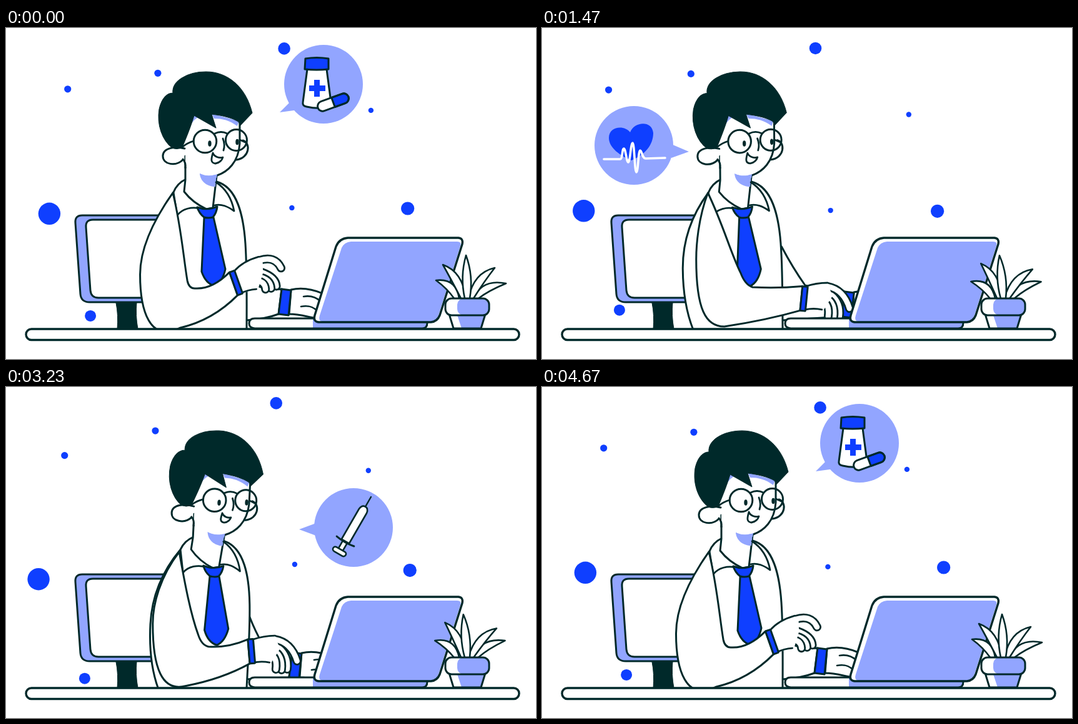
Recreate the animation shown at these times as an HTML page with a canvas. Size 848 px wide and 530 px high, loop 4710 ms.

```html
<!DOCTYPE html>
<html lang="en">
<head>
<meta charset="utf-8">
<title>At the desk</title>
<style>
html, body { margin: 0; width: 100%; height: 100%; overflow: hidden; background: #fff; }
canvas { display: block; width: 848px; height: 530px; }
</style>
</head>
<body>
<canvas id="stage" width="848" height="530"></canvas>
<script>
const ctx = document.getElementById('stage').getContext('2d');
const INK = '#00292a', BLUE = '#0f3fff', PALE = '#92a5ff', WHITE = '#fff';
const LOOP = 4710, CYCLE = 4670, TYPING = CYCLE / 4, TURN = 2 * Math.PI;

// Smooth periodic curve through values at uneven times
function spline(times, values, period, t) {
  const n = times.length;
  const time = i => times[(i + n) % n] + period * Math.floor(i / n);
  const value = i => values[(i + n) % n];
  t %= period;
  let i = n - 1;
  while (t < times[i]) i--;
  const slope = j => (value(j + 1) - value(j - 1)) / (time(j + 1) - time(j - 1));
  const span = time(i + 1) - time(i), u = (t - time(i)) / span, u2 = u * u, u3 = u2 * u;
  return (2 * u3 - 3 * u2 + 1) * value(i) + (u3 - 2 * u2 + u) * span * slope(i)
    + (3 * u2 - 2 * u3) * value(i + 1) + (u3 - u2) * span * slope(i + 1);
}

function shape(path, fill, width = 3) {
  const p = typeof path === 'string' ? new Path2D(path) : path;
  if (fill) { ctx.fillStyle = fill; ctx.fill(p); }
  if (width) { ctx.lineWidth = width; ctx.strokeStyle = INK; ctx.stroke(p); }
}

function disc(x, y, r, fill, width = 0) {
  const p = new Path2D();
  p.arc(x, y, r, 0, TURN);
  shape(p, fill, width);
}

function rounded(x, y, w, h, r, fill, width = 3) {
  const p = new Path2D();
  p.roundRect(x, y, w, h, r);
  shape(p, fill, width);
}

function group(draw, setup) {
  ctx.save();
  setup();
  draw();
  ctx.restore();
}

function at(x, y, angle, draw) {
  group(draw, () => { ctx.translate(x, y); ctx.rotate(angle); });
}

const smooth = (from, to, v) => {
  const u = Math.max(0, Math.min(1, (v - from) / (to - from)));
  return u * u * (3 - 2 * u);
};

// Key poses of one typing round: rest, reach, press, pull back, return
const poseTimes = [0, 268, 303, 530, 895];
const body = {
  lean: [0, -0.011, -0.008, 0.045, 0.051],
  wristX: [364, 420, 415, 347.5, 388.5],
  wristY: [409.5, 430, 433, 421, 423.5],
  tilt: [-0.34, 0.05, 0.1, -0.23, -0.08],
  farX: [441, 482, 484, 501, 458],
  farY: [418, 419, 422, 429, 425]
};

function poseAt(t) {
  const pose = {};
  for (const key in body) pose[key] = spline(poseTimes, body[key], TYPING, t);
  return pose;
}

// Each dot circles its home on its own ellipse, once per cycle
function drawDots(t) {
  const c = Math.cos(TURN * t / CYCLE), s = Math.sin(TURN * t / CYCLE);
  const drift = (r, x, y, xc, xs, yc, ys) => disc(x + xc * c + xs * s, y + yc * c + ys * s, r, BLUE);
  drift(9.8, 437.7, 30.2, 7.4, 3, 2.7, 3.6);
  drift(5.6, 99.8, 102.5, -1.1, 6.9, -4.7, -5.8);
  drift(5.6, 239.8, 71.9, 3.1, -0.3, 0.4, 1.8);
  drift(4.2, 583.5, 135, 0.4, 3.8, -3.1, 2.5);
  drift(4.2, 460.6, 288, -3.2, -0.2, -0.1, 4.4);
  drift(10.6, 640.3, 292.2, 2.4, -7.3, -3.2, -0.2);
  drift(9, 127.7, 459.6, 7.4, -0.9, 1.3, -8.1);
  drift(17.7, 62.2, 299.4, 7.2, 8.1, -2.1, -8.1);
}

function drawChair() {
  shape('M260 300H122Q110 300 111 312L119 426Q120 439 134 439H260', PALE);
  shape('M260 307H139Q127 307 128 319L135 420Q136 432 148 432H260', WHITE);
  shape('M176 440Q180 460 178 482H211Q207 460 209 440Z', INK, 1);
}

function drawFarArm({ lean, farX, farY }) {
  const g = Math.max(0, Math.min(1, (farX - 441) / 42));
  const x = 384 + 90 * lean, y = 375 - 25 * g, elbowX = 405 + 16 * g, elbowY = 414 - 2 * g;
  shape(`M${x} ${y}Q${(x + elbowX) / 2 - 1} ${(y + elbowY) / 2 + 3} ${elbowX} ${elbowY}
    Q${elbowX + 14} ${elbowY + 5} ${farX} ${farY}L${farX - 5} ${farY + 40}Q415 466 385 468`, WHITE);
  at(farX, farY, 0, () => {
    shape('M15 1C33 -3 51 1 65 7L57 47C43 45 29 40 12 40Z', WHITE);
    shape('M63 20C55 13 45 10 35 12M57 35C49 27 41 26 31 28', null, 2.6);
    shape('M0 0L15 2L11 42L-5 40Z', BLUE);
  });
}

function drawTorso() {
  shape('M288 242C275 248 270 258 268 263C240 300 226 340 226 385C226 430 234 465 245 490H385C385 440 386 390 383 345C380 300 370 255 337 246', WHITE);
  shape('M287 205V243L285 262C295 275 310 285 321 290L331 288L337 237V205Z', WHITE);
  shape('M310 233C320 238 330 237 337 234L335 254C322 254 311 246 310 233Z', PALE, 0);
  shape('M268 263L274 300C282 289 298 286 309 289M336 247C350 256 361 272 365 293C355 286 345 281 333 284', null, 2.8);
  shape('M317 304L313 390C318 405 326 411 334 413C342 409 348 400 351 386L332 303Z', BLUE);
  shape('M306 287Q322 293 338 286Q337 296 331 303Q324 305 317 303Q309 297 306 287Z', BLUE);
}

function drawHead(mouth) {
  shape('M379 180C392 184 390 208 369 211', WHITE);
  shape('M284 185L300 135L374 145V185C372 215 355 230 338 236L287 222V200Z', WHITE, 0);
  shape('M374 153V185C372 215 355 230 338 236', null);
  shape('M310 233C320 238 330 237 338 234L337 240L314 242Z', PALE, 0);
  shape('M286 193C270 189 251 192 251 205C251 219 272 222 283 211', WHITE);
  shape('M283 210Q288 215 287 224', null);
  shape('M300 138L308 143Q298 147 290 166ZM329 137L373 149L370 157C358 148 346 145 333 145Z', PALE, 0);
  shape('M266 192C250 180 241 155 245 130C249 112 258 104 267 104C265 85 290 70 320 70C355 70 384 95 394 136L375 156L372 150C362 144 345 140 329 138L336 160L301 140C297 154 290 172 282 191C277 194 270 194 266 192Z', INK, 1);
  disc(318.5, 181.5, 18.3, null, 3);
  disc(368.5, 179.5, 17, null, 3);
  shape('M334 169Q344 164 354 169M300 181Q290 184 283 190M374 179L385 184M347 177Q351 187 348 196', null, 2.8);
  for (const [x, y] of [[326, 185], [370, 182.5]]) {
    const eye = new Path2D();
    eye.ellipse(x, y, 2.7, 4.8, 0, 0, TURN);
    shape(eye, INK, 0);
  }
  group(() => shape('M331 200C329 208 326 216 335 217C342 216 346 211 347 207C341 209 333 206 331 200Z', WHITE, 2.8 / mouth),
    () => { ctx.translate(339, 213); ctx.scale(mouth, mouth); ctx.translate(-339, -213); });
}

function finger(d) {
  const p = new Path2D(d);
  for (const [color, width] of [[INK, 14], [WHITE, 8.4]]) {
    ctx.strokeStyle = color;
    ctx.lineWidth = width;
    ctx.stroke(p);
  }
}

// open: 0 is a hand bent over the keys, 1 a hand lifted off them
function drawHand(open) {
  for (let i = 0; i < 3; i++) {
    const x = 61 - 9 * i + 4 * open;
    finger(`M${48 - 8 * i} ${5 * i - 6}Q${x + 3} 8 ${x} ${29 + i * (2 - i) - 7 * open}`);
  }
  const x = 42 + 8 * open, top = -25 - 6 * open;
  finger(`M${x} ${top + 6}Q${68 + 8 * open} ${-14 - 12 * open} ${77 + 3 * open} ${16 - 20 * open}`);
  const crown = `M6 -19Q24 ${top} ${x} ${top}`;
  shape(`${crown}L${x + 4} ${top + 11}L50 -4L36 18L6 18Z`, WHITE, 0);
  shape(`${crown}M6 18Q20 15 33 18`, null, 2.8);
}

// The elbow follows the wrist, less and less as the arm stretches
function drawNearArm({ lean, wristX, wristY, tilt }) {
  const stretch = 1 - Math.max(0, 1 - (wristX - 347.5) / 70) ** 1.6;
  const along = (from, by) => from + by * stretch;
  const half = 19.5, dx = half * Math.sin(tilt), dy = half * Math.cos(tilt);
  const shoulder = `${267 + 200 * lean} 264`;
  const backX = along(197, 50), lowX = along(272, 20), innerX = along(283, 54), innerY = along(418, -3);
  const topX = wristX + dx, topY = wristY - dy, endX = wristX - dx, endY = wristY + dy;
  shape(`M${shoulder}C${along(235, 15)} ${along(300, 5)} ${backX} 348 ${backX} ${along(408, -38)}
    C${backX} ${along(452, -2)} ${backX + 15} ${along(520, -42)} ${lowX} ${along(481, -3)}
    Q${(lowX + endX) / 2 + 6} 468 ${endX} ${endY}L${topX} ${topY}
    Q${(topX + innerX) / 2} ${innerY + 2} ${innerX} ${innerY}
    Q${along(275, 50)} ${along(420, -9)} ${along(275, 43)} ${along(411, -19)}
    C${along(274, 28)} ${along(370, -10)} ${along(275, 15)} ${along(320, -5)} ${shoulder}Z`, WHITE);
  at(wristX, wristY, Math.min(0, tilt + 0.07), () => drawHand(1 - smooth(0.35, 0.75, stretch)));
  at(wristX, wristY, tilt, () => rounded(0, -half, 8.5, 2 * half, 1, BLUE));
}

function drawPerson(t) {
  const pose = poseAt(t);
  const mouth = 1 - 0.42 * Math.exp(-(((t - 2600) / 550) ** 2));
  group(() => {
    drawFarArm(pose);
    group(() => { drawTorso(); drawHead(mouth); }, () => {
      ctx.translate(330, 480);
      ctx.rotate(pose.lean);
      ctx.translate(-330, -480);
    });
    drawNearArm(pose);
  }, () => {
    ctx.beginPath();
    ctx.rect(0, 0, 848, 483);
    ctx.clip();
  });
}

function drawLaptop() {
  const base = 'M398 465H674V472Q674 481 666 481H398Q389 480 389 473Q389 465 398 465Z';
  shape(base, WHITE, 0);
  shape('M491 466H674V472Q674 481 666 481H491Z', PALE, 0);
  shape(base, null);
  const screen = 'M547 336H724Q732 337 730 346L694 460Q690 470 680 471H500Q491 470 494 460L528 350Q533 337 547 336Z';
  shape(screen, WHITE, 0);
  shape('M552 342H722Q729 342 727 349L692 460Q688 470 678 470H506Q499 469 502 460L537 352Q541 343 552 342Z', PALE, 0);
  shape(screen, null, 3.4);
}

function drawPlant(t) {
  const sway = 0.035 * (1 - Math.cos(2 * TURN * t / CYCLE));
  // A blade arches from its foot to its tip; side +1 or -1 is the way it sways
  const leaf = (foot, x, y, side) => at(foot, 433, side * sway, () => {
    const tx = x - foot, ty = y - 433, length = Math.hypot(tx, ty);
    const cx = tx / 2 + (738 - foot - tx / 2) / 4, cy = ty / 2 - 10 * Math.min(1, Math.abs(tx) / 25);
    const nx = -ty / length * 11, ny = tx / length * 11;
    shape(`M4 0Q${cx + nx} ${cy + ny} ${tx} ${ty}Q${cx - nx} ${cy - ny} -4 0`, WHITE, 2.6);
  });
  leaf(721, 688, 404, -1);
  leaf(752, 800, 409, -1);
  leaf(732, 699, 379, 1);
  leaf(744, 782, 384, 1);
  leaf(738, 736, 364, -1);
  const pot = 'M709 458L716 481H760L767 458Z';
  shape(pot, WHITE, 0);
  shape('M722 460H766L760 481H729Z', PALE, 0);
  shape(pot, null);
  rounded(703, 433, 70, 27, 10, WHITE, 0);
  rounded(722, 433, 51, 27, 10, PALE, 0);
  rounded(703, 433, 70, 27, 10, null);
}

function drawPills() {
  disc(508, 90, 63, PALE);
  shape('M438 135L455 118L475 130Z', PALE, 0);
  shape('M482 66L475 119Q474 125 481 126Q498 130 514 127Q521 126 520 119L513 66Z', WHITE);
  shape('M479 49Q497 46 516 49V66Q497 68 478 66Z', BLUE);
  ctx.fillStyle = BLUE;
  ctx.fillRect(485, 92, 26, 9);
  ctx.fillRect(493, 83, 9, 27);
  at(523.5, 119, -0.35, () => {
    rounded(-26, -8, 52, 16, 8, WHITE, 0);
    shape('M0 -8H18A8 8 0 0 1 18 8H0Z', BLUE);
    rounded(-26, -8, 52, 16, 8, null);
  });
}

function drawHeart() {
  disc(147, 188, 63, PALE);
  shape('M235 198L207 186V208Z', PALE, 0);
  shape('M141 167C132 155 107 157 107 176C107 192 126 205 143 212C165 203 178 187 178 168C176 147 147 150 141 167Z', BLUE, 0);
  ctx.lineWidth = 3.6;
  ctx.strokeStyle = WHITE;
  ctx.stroke(new Path2D('M99 210H125C129 210 128 193 131 193C134 193 135 215 138 215C141 215 142 184 145 184C148 184 148 231 151 231C154 231 154 196 157 196C160 196 160 209 166 209L197 208'));
}

function drawSyringe() {
  disc(556, 225, 63, PALE);
  shape('M469 228L496 218V238Z', PALE, 0);
  at(584, 176, Math.PI / 6, () => {
    shape('M0 0V18', null, 2.4);
    shape('M-4 80H4V98H-4Z', WHITE, 2.6);
    rounded(-11.5, 97, 23, 8, 4, WHITE, 2.6);
    shape('M-7 82V26Q-6 18 0 18Q6 18 7 26V82Z', WHITE, 2.6);
    shape('M-16 82Q0 85 16 82', null, 3);
  });
}

const backOut = x => 1 + 2.70158 * (x - 1) ** 3 + 1.70158 * (x - 1) ** 2;

// Pops in from the tail tip, then pulls back into it
function bubble(draw, x, y, start, stay, t) {
  const age = (t - start + CYCLE) % CYCLE;
  const k = age < stay ? Math.min(1, age / 500) : 1 - (age - stay) / 450;
  const size = k > 0 ? backOut(k) : 0;
  if (size < 0.01) return;
  group(draw, () => { ctx.translate(x, y); ctx.scale(size, size); ctx.translate(-x, -y); });
}

function render(now) {
  const t = Math.min(now % LOOP, CYCLE - 0.01);
  ctx.fillStyle = WHITE;
  ctx.fillRect(0, 0, 848, 530);
  ctx.lineJoin = ctx.lineCap = 'round';
  drawDots(t);
  bubble(drawPills, 438, 135, 4150, 1120, t);
  bubble(drawHeart, 235, 198, 240, 1270, t);
  bubble(drawSyringe, 469, 228, 2345, 1105, t);
  drawChair();
  drawPerson(t);
  drawLaptop();
  drawPlant(t);
  rounded(32, 482, 789, 17.5, 8.7, WHITE, 3.4);
}

const begin = performance.now();
function tick() {
  render(performance.now() - begin);
  requestAnimationFrame(tick);
}
tick();
</script>
</body>
</html>
```
